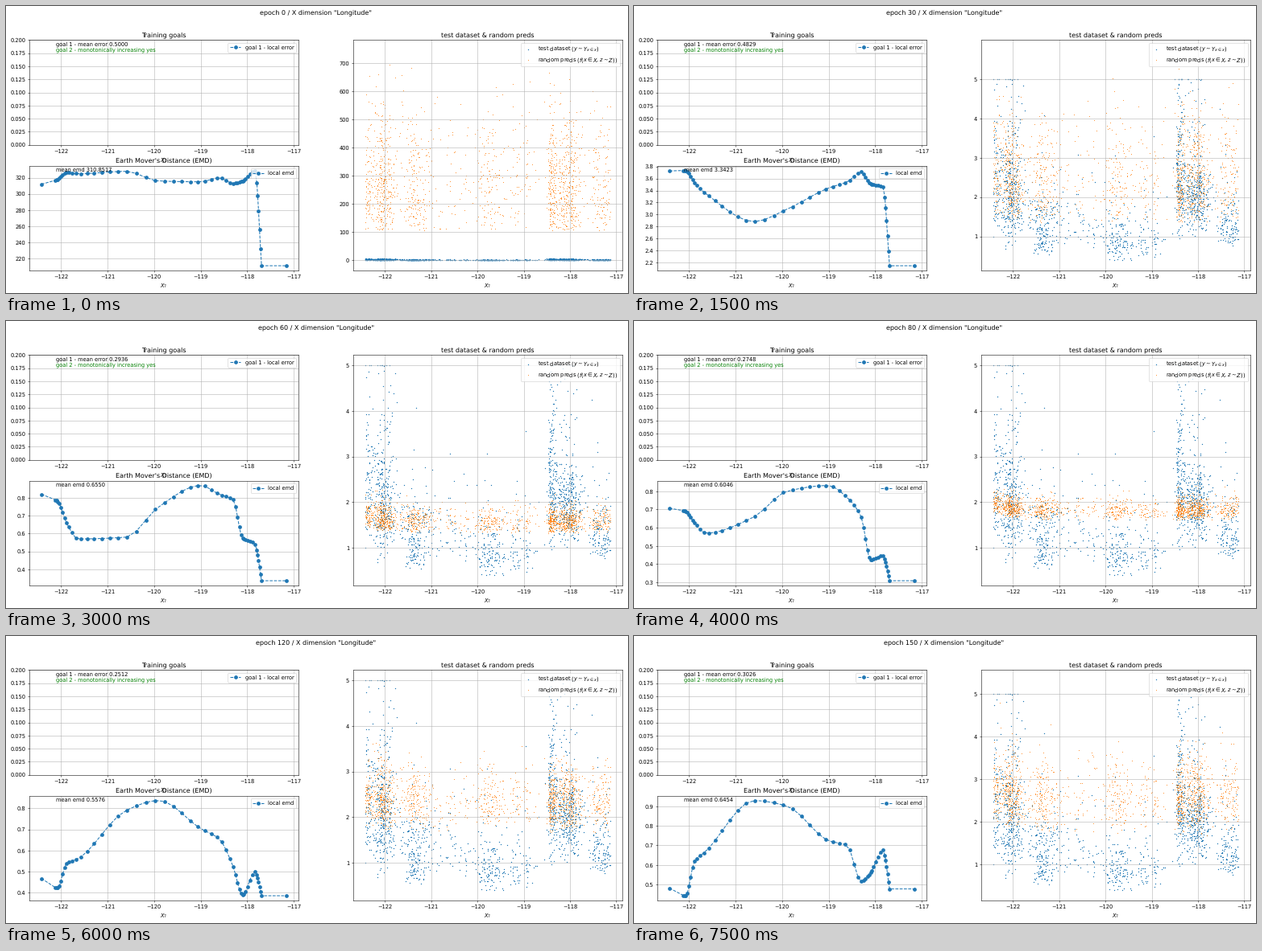
A matplotlib script that plays this animation: 772 px wide and 357 px high, repeating every 8000 ms.

```python
import numpy as np
import matplotlib.pyplot as plt
from matplotlib.animation import FuncAnimation

W, H, DPI = 772, 357, 48
BLUE, ORANGE = "#1f77b4", "#ff7f0e"
FRAMES, INTERVAL, EPOCH_STEP = 16, 500, 10
WEST, EAST = -122.42, -117.13

plt.rcParams.update({"font.family": "DejaVu Sans", "text.hinting": "none"})

# Longitudes where the local distance curve bends
KNOTS = [-122.42, -122.07, -121.88, -121.64, -120.6, -119.9,
         -119, -118.6, -118.3, -118.1, -117.83, -117.69]

# epoch, mean error, mean emd, predictions (low, high, concentration), curve
KEYS = [
    (0, .5, 310.8517, (105, 744, 5),
     [312, 318, 327, 325, 328, 316, 315, 320, 313, 316, 329, 211]),
    (20, .4996, 8.4661, (4.9, 23.45, 5),
     [8.17, 8.3, 8.9, 8.97, 9.38, 8.86, 8.53, 8.6, 8.2, 8.45, 8.95, 5.82]),
    (40, .4663, 1.3195, (.37, 1.4, 9),
     [1.7, 1.68, 1.4, 1.25, .885, 1.075, 1.39, 1.46, 1.68, 1.46, 1.34, .79]),
    (60, .2936, .6550, (1.3, 2.4, 9),
     [.82, .78, .66, .57, .58, .75, .87, .82, .79, .575, .54, .336]),
    (80, .2748, .6046, (1.6, 2.5, 9),
     [.707, .69, .625, .57, .66, .8, .832, .765, .66, .425, .447, .309]),
    (120, .2512, .5576, (1.55, 4.6, 14),
     [.467, .422, .54, .56, .79, .838, .704, .655, .523, .388, .5, .385]),
    (150, .3026, .6454, (1.6, 5.32, 14),
     [.481, .442, .62, .67, .93, .902, .724, .7, .515, .56, .676, .477]),
]


def sample_longitudes():
    """Steps are short near the two crowded coasts, wide in between."""
    step = np.interp(np.arange(49),
                     [0, 7, 12, 18, 23, 27, 33, 37, 42, 44, 48],
                     [25, 45, 150, 205, 175, 120, 40, 30, 58, 18, 22])
    path = np.append(0, np.cumsum(step)) / step.sum()
    return np.concatenate([[WEST], -122.12 + 4.43 * path, [-117.153]])


def monotone_curve(x, xk, yk):
    """Cubic Hermite through the knots without overshoot."""
    h = np.diff(xk)
    d = np.diff(yk) / h
    a, b = d[:-1], d[1:]
    slope = np.concatenate([d[:1], np.zeros(len(a)), d[-1:]])
    same = a * b > 0
    slope[1:-1][same] = 2 * a[same] * b[same] / (a + b)[same]
    x = np.clip(x, xk[0], xk[-1])
    i = np.clip(np.searchsorted(xk, x) - 1, 0, len(h) - 1)
    t = (x - xk[i]) / h[i]
    ease = t * t * (3 - 2 * t)
    return (yk[i] + (yk[i + 1] - yk[i]) * ease
            + h[i] * t * (1 - t) * (slope[i] * (1 - t) - slope[i + 1] * t))


def log_mix(a, b, w):
    a, b = np.asarray(a, float), np.asarray(b, float)
    return a * (b / a) ** w


def state(epoch):
    i = max(k for k in range(len(KEYS) - 1) if KEYS[k][0] <= epoch)
    start, end = KEYS[i:i + 2]
    w = (epoch - start[0]) / (end[0] - start[0])
    error = start[1] + (end[1] - start[1]) * w
    emd, spread, knots = (log_mix(a, b, w) for a, b in zip(start[2:], end[2:]))
    return error, emd, spread, monotone_curve(LON, np.array(KNOTS), knots)


def make_dataset(n=1450, seed=7):
    rng = np.random.default_rng(seed)
    # longitude, its deviation, weight, median value, log deviation
    clusters = np.array([
        (-122.36, .07, 6, 2.6, .35), (-122.03, .13, 24, 2.1, .36),
        (-121.33, .15, 12, 1.2, .35), (-120.60, .35, 6, 1.25, .35),
        (-119.75, .15, 8, .85, .35), (-119.10, .20, 6, .95, .40),
        (-118.38, .06, 14, 2.5, .35), (-118.03, .14, 23, 2.0, .25),
        (-117.35, .15, 9, 1.25, .25)])
    weight = clusters[:, 2] / clusters[:, 2].sum()
    mean, sd, _, median, sigma = clusters[rng.choice(len(weight), n, p=weight)].T
    x = rng.normal(mean, sd)
    x = WEST + np.abs(x - WEST)
    x = EAST - np.abs(EAST - x)
    y = median * np.exp(sigma * rng.normal(size=n))
    y *= np.where(rng.random(n) < .05, 2, 1)
    return x, np.clip(y, .4, 5)


def predict(x, spread, seed):
    lo, hi, conc = spread
    rng = np.random.default_rng(seed)
    y = lo + (hi - lo) * rng.beta(.28 * conc, .72 * conc, len(x))
    return y + .15 * np.exp((WEST - x) / .35)


def padded(lo, hi):
    pad = .05 * (hi - lo)
    return lo - pad, hi + pad


LON = sample_longitudes()
data_x, data_y = make_dataset()

fig = plt.figure(figsize=(W / DPI, H / DPI), dpi=DPI, facecolor="white")


def panel(left, top, right, bottom, title, xlim):
    ax = fig.add_axes([left / W, 1 - bottom / H,
                       (right - left) / W, (bottom - top) / H])
    ax.set_title(title)
    ax.set_xlabel("$X_7$")
    ax.set_xlim(*xlim)
    ax.grid(True)
    return ax


lon_lim = padded(LON[0], LON[-1])
goal_ax = panel(28.8, 42.4, 363.4, 172.7, "Training goals", lon_lim)
emd_ax = panel(28.8, 198.7, 363.4, 329, "Earth Mover's Distance (EMD)", lon_lim)
data_ax = panel(430.7, 42.4, 765.2, 329, "test dataset & random preds",
                padded(WEST, EAST))

goal_ax.set_ylim(0, .2)
goal_ax.plot([], [], "o--", color=BLUE, label="goal 1 - local error")
goal_text = goal_ax.text(.1, .945, "", transform=goal_ax.transAxes)
goal_ax.text(.1, .895, "goal 2 - monotonically increasing yes",
             color="green", transform=goal_ax.transAxes)

emd_line, = emd_ax.plot(LON, np.ones_like(LON), "o--", color=BLUE,
                        label="local emd")
emd_text = emd_ax.text(.1, .945, "", transform=emd_ax.transAxes)

data_ax.scatter(data_x, data_y, s=4, lw=0, color=BLUE,
                label=r"test dataset ($y{\sim}Y_{x{\in}x}$)")
preds = data_ax.scatter(data_x, data_y, s=2.3, lw=0, color=ORANGE,
                        label=r"random preds ($f(x{\in}X, z{\sim}Z)$)")

for ax in (goal_ax, emd_ax, data_ax):
    ax.legend(loc="upper right", labelspacing=.4)

heading = fig.suptitle("", x=.4985, y=.987, fontsize=12)


def draw(frame):
    epoch = frame * EPOCH_STEP
    error, emd, spread, curve = state(epoch)
    heading.set_text(f'epoch {epoch} / X dimension "Longitude"')
    goal_text.set_text(f"goal 1 - mean error {error:.4f}")
    emd_text.set_text(f"mean emd {emd:.4f}")
    emd_line.set_ydata(curve)
    emd_ax.set_ylim(*padded(curve.min(), curve.max()))
    preds.set_offsets(np.column_stack([data_x, predict(data_x, spread, epoch)]))
    data_ax.set_ylim(*padded(min(.4, spread[0]), max(5, spread[1])))
    return heading, goal_text, emd_text, emd_line, preds


anim = FuncAnimation(fig, draw, frames=FRAMES, interval=INTERVAL,
                     repeat=True, repeat_delay=0, blit=False)
plt.show()
```
